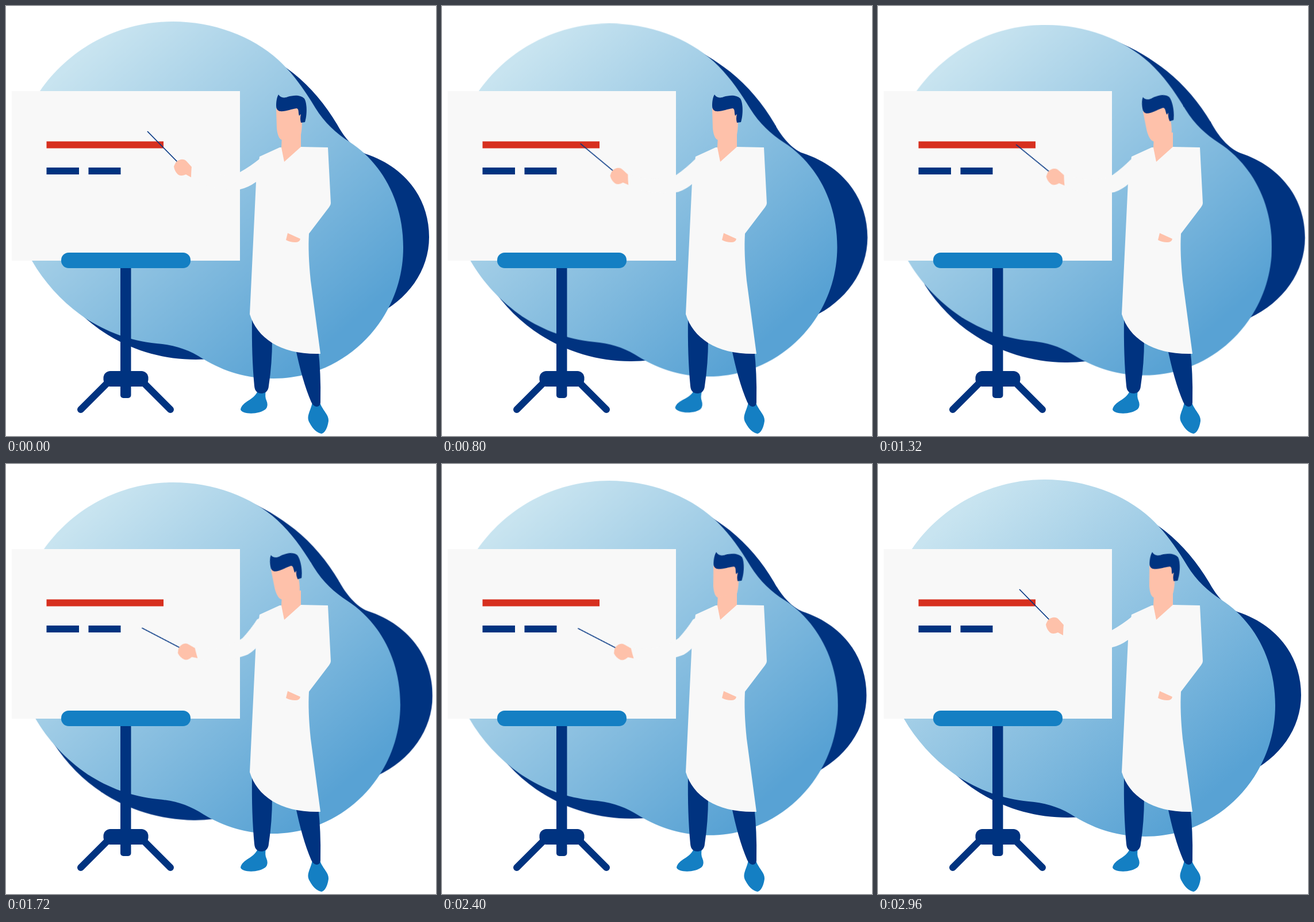
An HTML page that plays this animation: 748 px wide and 748 px high, repeating every 3000 ms.

```html
<!DOCTYPE html>
<html lang="en">
<head>
<meta charset="utf-8">
<title>Presentation</title>
<style>
  html, body { margin: 0; width: 100%; height: 100%; overflow: hidden; background: #fff; }
  svg { display: block; width: 100vw; height: 100vh; }

  .navy { fill: #003380; }
  .blue { fill: #147fc3; }
  .skin { fill: #fec1aa; }
  .paper { fill: #f8f8f8; }
  .line { fill: none; stroke: #003380; }

  .shrink, .grow, .arm, .head, .foot { animation: 3s linear infinite; }
  .shrink { transform-origin: 370px 337px; animation-name: shrink; }
  .grow { transform-origin: 370px 337px; animation-name: grow; }
  .arm { transform-origin: 453px 282px; animation-name: point; }
  .head { transform-origin: 495px 235px; animation-name: turn; }
  .foot { transform-origin: 445px 672px; animation-name: tap; }

  @keyframes shrink {
    0%, 96%, 100% { transform: scale(1); }
    48% { transform: scale(.98); }
  }
  @keyframes grow {
    0%, 96%, 100% { transform: scale(1); }
    48% { transform: scale(1.02); }
  }
  @keyframes point {
    0%, 96%, 100% { transform: rotate(0deg); }
    28.5% { transform: rotate(-6.2deg); }
    44% { transform: rotate(-6.3deg); animation-timing-function: ease-in-out; }
    56.5% { transform: rotate(-18deg); }
    80% { transform: rotate(-18.2deg); animation-timing-function: ease-in-out; }
  }
  @keyframes turn {
    0% { transform: rotate(0deg); }
    30% { transform: rotate(0deg); animation-timing-function: ease-in-out; }
    42% { transform: rotate(-9.6deg); }
    61% { transform: rotate(-9.6deg); animation-timing-function: ease-in-out; }
    75%, 100% { transform: rotate(2.2deg); }
  }
  @keyframes tap {
    0%, 20%, 34%, 100% { transform: rotate(0deg); }
    26%, 28% { transform: rotate(5deg); }
  }
</style>
</head>
<body>
<svg viewBox="0 0 748 748">
  <defs>
    <linearGradient id="sky" gradientUnits="userSpaceOnUse" x1="130" y1="90" x2="560" y2="590">
      <stop offset="0" stop-color="#c8e4f0"/>
      <stop offset="1" stop-color="#58a2d4"/>
    </linearGradient>
  </defs>

  <!-- backdrop -->
  <path class="grow navy" d="M412 66C445 78 474 97 500 117C530 141 556 172 576 206
    C588 228 605 249 625 257C695 280 736 335 736 402C736 460 699 512 641 539L600 553L362 613
    Q346 615 330 615C235 615 143 570 87 483L75 440L120 300Z"/>
  <path class="shrink" fill="url(#sky)" d="M290 27C360 27 428 52 474 94C500 118 520 147 538 177
    C554 203 575 222 597 236C650 270 691 335 691 420C691 545 590 648 465 648
    C418 648 380 636 343 614C318 598 295 590 262 587C215 582 175 567 138 543
    C100 517 68 483 45 443C4 372 6 226 59 148C110 74 195 27 290 27Z"/>

  <!-- easel -->
  <rect class="paper" x="10" y="148" width="397" height="295"/>
  <rect x="70.5" y="235.5" width="203.5" height="12" fill="#d7301f"/>
  <rect class="navy" x="70.5" y="281" width="56.5" height="12"/>
  <rect class="navy" x="143.5" y="281" width="56" height="12"/>
  <path class="line" stroke-width="12" stroke-linecap="round" d="M180 652L130 702M236 652L286 702"/>
  <rect class="navy" x="199" y="445" width="18.5" height="237" rx="5"/>
  <rect class="navy" x="169.5" y="635" width="78" height="27" rx="12"/>
  <rect class="blue" x="96" y="429" width="225" height="27" rx="13"/>

  <!-- legs -->
  <path class="foot blue" d="M438 669C432 686 411 687 408 702C411 711 441 711 452 701
    Q457 695 453 686Q450 680 452 669Z"/>
  <path class="blue" d="M533 688C531 704 521 713 528 725Q537 742 549 744Q558 741 561 722
    C562 711 551 704 546 690Z"/>
  <path class="navy" d="M428 540Q427 610 432 661Q433 674 445 674Q456 673 457 661Q463 622 463 580Z"/>
  <path class="navy" d="M503 592Q515 652 531 689Q535 697 541 697Q548 696 547 686Q548 640 543 595Z"/>

  <!-- pointing arm -->
  <g class="arm">
    <path class="line" stroke-width="1.7" d="M246 218L298 271"/>
    <path class="skin" d="M292 279Q296 268 304 267Q310 266 314 270L323 280L322 298L313 293
      Q304 297 299 293Q293 287 292 279Z"/>
    <path class="paper" d="M323 279Q370 301 407 289Q425 279 441 266L462 262L462 292L435 306
      Q421 316 407 319Q365 322 322 300Z"/>
  </g>

  <!-- body -->
  <path class="paper" d="M441 262L476 246L513 245L560 246L565 343Q565 346 562 350L527 396
    Q525 430 530 478L547 605C480 607 437 579 424 536L435 306Z"/>
  <path class="skin" d="M480 226L513 220L513 245L484 271L479 246Z"/>
  <path class="skin" d="M490 395L512 405Q511 411 503 411Q494 411 487 407Z"/>

  <!-- head -->
  <g class="head">
    <path class="skin" d="M470 178L471 213Q473 231 480 233L513 224Q516 208 514 195L512 172Z"/>
    <path class="navy" d="M474 154C477 159 483 161 490 158C500 155 512 154 519 161
      C524 169 524 190 520 202L513 203Q511 196 513 188L510 191C508 185 510 180 506 178
      C496 179 487 184 476 183Q470 181 470 174C470 166 471 159 474 154Z"/>
  </g>
</svg>
</body>
</html>
```
